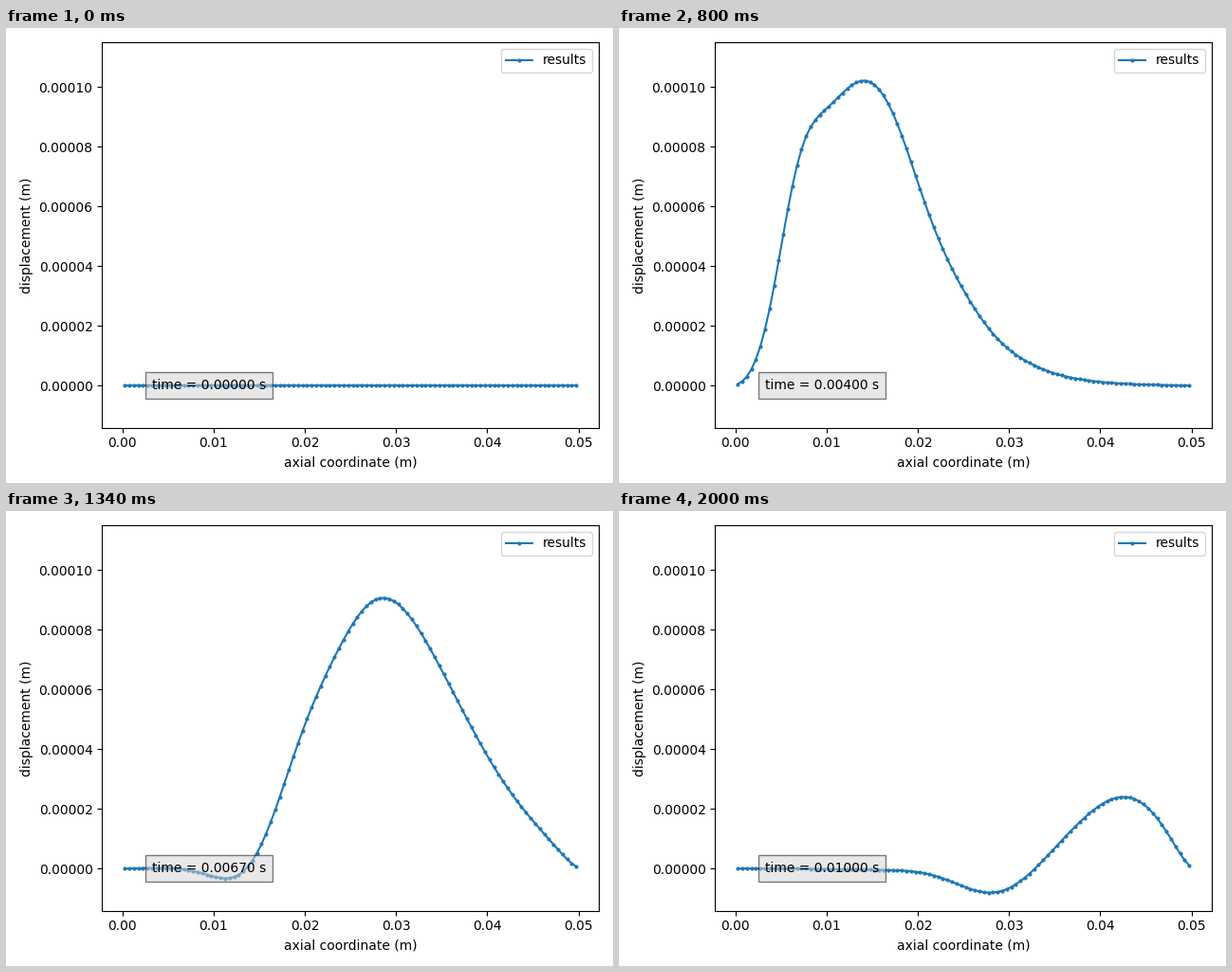
A matplotlib script that plays this animation: 640 by 480 pixels, repeating every 2020 ms.

```python
import numpy as np
import matplotlib.pyplot as plt
from matplotlib.animation import FuncAnimation

# Pressure pulse running through a flexible tube (1D flow, clamped elastic wall)
L, R0, H = 0.05, 0.005, 0.001
E, NU, RHO_F, RHO_S = 3e5, 0.3, 1000.0, 1200.0
PULSE, T_PULSE = 1333.2, 0.003
M, STEPS, DT = 100, 100, 1e-4
BETA, GAMMA = 0.64, 1.1
DZ = L / M
x = (np.arange(M) + 0.5) * DZ


def area(q):
    """Relative cross section, extended to the ghost cells."""
    return np.pad((1 + q[2:-2])**2, 1, mode="edge")


def simulate():
    """Wall displacement for every time step, shape (STEPS + 1, M)."""
    S, T = np.eye(M + 2), np.eye(M + 4)
    lo, mid, hi = S[:-2], S[1:-1], S[2:]
    wall = T[2:-2]
    d2 = T[1:-3] - 2 * wall + T[3:-1]
    d4 = T[:-4] - 4 * T[1:-3] + 6 * wall - 4 * T[3:-1] + T[4:]

    # Wall: inertia, bending and hoop stiffness, Newmark in time
    scale = R0 / RHO_F
    b1 = E * H**3 / (12 * (1 - NU**2))
    b2 = 2 * NU * b1 / R0**2
    b3 = E * H / (1 - NU**2) / R0**2 + b1 / R0**4
    mass = RHO_S * H * scale
    stiff = scale * (b1 / DZ**4 * d4 - b2 / DZ**2 * d2 + b3 * wall)
    k0, k1, k2 = 1 / (BETA * DT**2), 1 / (BETA * DT), 0.5 / BETA - 1

    # Given pressure at both ends, extrapolated velocity, clamped wall
    rate = DZ / DT
    zero_u, zero_w = np.zeros((M, M + 2)), np.zeros((M, M + 4))
    ends = np.zeros((8, 3 * M + 8))
    ends[0, :3] = 1, -2, 1
    ends[1, M + 2] = 1
    ends[2, M - 1:M + 2] = 1, -2, 1
    ends[3, 2 * M + 3] = 1
    ends[[4, 5, 6, 7], [2 * M + 4, 2 * M + 5, -2, -1]] = 1

    u, q = np.zeros(M + 2), np.zeros(M + 4)
    vel, acc = np.zeros(M + 4), np.zeros(M + 4)
    out = [np.zeros(M)]
    for n in range(1, STEPS + 1):
        un, qn, an = u, q, area(q)
        bounds = np.zeros(8)
        if n * DT <= T_PULSE + DT / 10:
            bounds[1] = PULSE / RHO_F
        inertia = mass * (k0 * qn + k1 * vel + k2 * acc)
        rhs = np.concatenate([rate * (an[1:-1] - 1),
                              rate * (an * un)[1:-1],
                              inertia[2:-2],
                              bounds])
        for _ in range(3):
            a = area(q)
            g = (a[:-1] + a[1:]) / 4
            flux = g * (u[:-1] + u[1:])
            gl, gr = g[:-1, None], g[1:, None]
            mass_rows = np.hstack([gr * (mid + hi) - gl * (lo + mid),
                                   -(hi - 2 * mid + lo) / rate,
                                   rate * (2 + q[2:-2, None]) * wall])
            flow_rows = np.hstack([(rate * a[1:-1] + flux[1:])[:, None] * mid
                                   - flux[:-1, None] * lo,
                                   gr * (hi - mid) + gl * (mid - lo),
                                   zero_w])
            wall_rows = np.hstack([zero_u, -mid, stiff + mass * k0 * wall])
            system = np.vstack([mass_rows, flow_rows, wall_rows, ends])
            u, _p, q = np.split(np.linalg.solve(system, rhs),
                                [M + 2, 2 * M + 4])
        new = k0 * (q - qn) - k1 * vel - k2 * acc
        vel = vel + DT * ((1 - GAMMA) * acc + GAMMA * new)
        acc = new
        out.append(R0 * q[2:-2])
    return np.array(out)


data = simulate()

fig, ax = plt.subplots(figsize=(6.4, 4.8), dpi=100)
line, = ax.plot(x, data[0], "o-", color="C0", lw=1.5, ms=2, label="results")
ax.set_ylim(-1.416e-5, 1.1505e-4)
ax.set_xlabel("axial coordinate (m)")
ax.set_ylabel("displacement (m)")
ax.legend(loc="upper right")
clock = ax.text(0.1, 0.1, "time = 0.00000 s", transform=ax.transAxes,
                bbox=dict(facecolor="lightgray", alpha=0.5, pad=5))
fig.tight_layout()


def update(n):
    line.set_ydata(data[n])
    clock.set_text(f"time = {n * DT:.5f} s")
    return line, clock


anim = FuncAnimation(fig, update, frames=STEPS + 1, interval=20, repeat=True)
plt.show()
```
